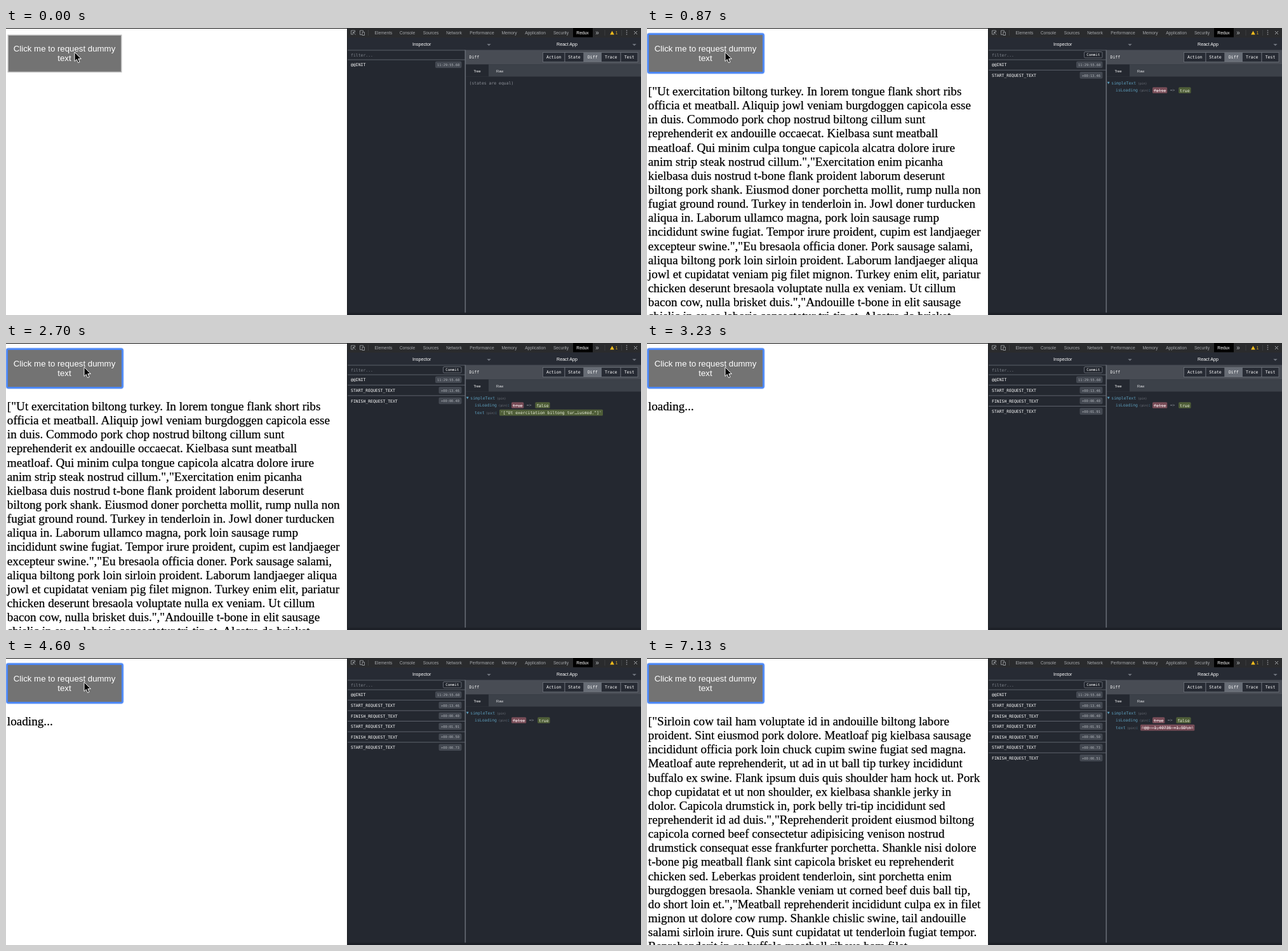
Animation of 1000x452 px, one loop 7.16 s. Source, as an HTML page:

```html
<!DOCTYPE html>
<html lang="en">
<head>
<meta charset="utf-8">
<title>Requesting dummy text</title>
<style>
html, body { margin: 0; width: 100%; height: 100%; overflow: hidden; background: #fff; }
svg { display: block; width: 100%; height: 100%; }
.serif { font: 19.2px "Liberation Serif", serif; stroke: #000; stroke-width: .25; }
.sans { font-family: "Liberation Sans", sans-serif; }
.mono { font-family: "DejaVu Sans Mono", monospace; }
</style>
</head>
<body>
<svg viewBox="0 0 1000 452"><g id="scene"></g><g id="cursor"></g></svg>
<script>
const LOOP = 7160;
const scene = document.getElementById('scene');
const cursor = document.getElementById('cursor');

const first = `["Ut exercitation biltong turkey. In lorem tongue flank short ribs
officia et meatball. Aliquip jowl veniam burgdoggen capicola esse
in duis. Commodo pork chop nostrud biltong cillum sunt
reprehenderit ex andouille occaecat. Kielbasa sunt meatball
meatloaf. Qui minim culpa tongue capicola alcatra dolore irure
anim strip steak nostrud cillum.","Exercitation enim picanha
kielbasa duis nostrud t-bone flank proident laborum deserunt
biltong pork shank. Eiusmod doner porchetta mollit, rump nulla non
fugiat ground round. Turkey in tenderloin in. Jowl doner turducken
aliqua in. Laborum ullamco magna, pork loin sausage rump
incididunt swine fugiat. Tempor irure proident, cupim est landjaeger
excepteur swine.","Eu bresaola officia doner. Pork sausage salami,
aliqua biltong pork loin sirloin proident. Laborum landjaeger aliqua
jowl et cupidatat veniam pig filet mignon. Turkey enim elit, pariatur
chicken deserunt bresaola voluptate nulla ex veniam. Ut cillum
bacon cow, nulla brisket duis.","Andouille t-bone in elit sausage
chislic in ex ea laboris consectetur tri-tip et. Alcatra do brisket`.split('\n');
const third = `["Sirloin cow tail ham voluptate id in andouille biltong labore
proident. Sint eiusmod pork dolore. Meatloaf pig kielbasa sausage
incididunt officia pork loin chuck cupim swine fugiat sed magna.
Meatloaf aute reprehenderit, ut ad in ut ball tip turkey incididunt
buffalo ex swine. Flank ipsum duis quis shoulder ham hock ut. Pork
chop cupidatat et ut non shoulder, ex kielbasa shankle jerky in
dolor. Capicola drumstick in, pork belly tri-tip incididunt sed
reprehenderit id ad duis.","Reprehenderit proident eiusmod biltong
capicola corned beef consectetur adipisicing venison nostrud
drumstick consequat esse frankfurter porchetta. Shankle nisi dolore
t-bone pig meatball flank sint capicola brisket eu reprehenderit
chicken sed. Leberkas proident tenderloin, sint porchetta enim
burgdoggen bresaola. Shankle veniam ut corned beef duis ball tip,
do short loin et.","Meatball reprehenderit incididunt culpa ex in filet
mignon ut dolore cow rump. Shankle chislic swine, tail andouille
salami sirloin irure. Quis sunt cupidatat ut tenderloin fugiat tempor.
Reprehenderit in ex buffalo meatball ribeye ham filet`.split('\n');
const second = ['["Eiusmod doner porchetta mollit, rump nulla non', ...first.slice(8), ...third.slice(8, 15)];
const loading = ['loading...'];

// [time, value]: what the page shows, and how many actions are logged
const pages = [[0, []], [400, loading], [800, first], [3100, loading], [4020, second], [4400, loading], [4800, third]];
const logs = [[0, 1], [430, 2], [950, 3], [3130, 4], [4060, 5], [4440, 6], [4880, 7]];
const stamps = ['11:29:55.60', '+00:13.46', '+00:00.40', '+00:01.91', '+00:00.50', '+00:00.73', '+00:00.51'];
const moves = [[30, 108, 38], [330, 123, 38], [4870, 123, 38], [5200, 360, 126], [6250, 360, 126], [6600, 620, -20]];

const at = (list, t) => list.filter(k => k[0] <= t).pop()[1];
const rect = (x, y, w, h, fill, more = '') =>
  `<rect x="${x}" y="${y}" width="${w}" height="${h}" fill="${fill}" ${more}/>`;
const text = (x, y, str, size, fill, cls = 'mono', more = '') =>
  `<text x="${x}" y="${y}" font-size="${size}" fill="${fill}" class="${cls}" ${more}>${str}</text>`;
const label = (x, y, str, size, fill, cls = 'sans') => text(x, y, str, size, fill, cls, 'text-anchor="middle"');
const path = (d, fill, more = '') => `<path d="${d}" fill="${fill}" ${more}/>`;
const line = (d, stroke, w = 1) => path(d, 'none', `stroke="${stroke}" stroke-width="${w}"`);

function page(lines, focused) {
  const ring = (w, o) => rect(1.7, 9.7, 181.6, 60.6, 'none', `rx="2" stroke="#4a86f5" stroke-width="${w}" opacity="${o}"`);
  return rect(0, 0, 537, 452, '#fff') + rect(0, 0, 537, 1, '#111') +
    (focused ? ring(5, .35) + ring(2.8, 1) + rect(3, 11, 179, 58, '#737373')
      : rect(2.5, 10.5, 180, 59.5, '#b9b9b9') + rect(4, 12, 177, 56.5, '#737373')) +
    label(92, 36.9, 'Click me to request dummy', 13.25, '#fff') +
    label(92, 52.3, 'text', 13.25, '#fff') +
    lines.map((s, i) => `<text class="serif" x="1.8" y="${106.1 + i * 22.13}">${s}</text>`).join('');
}

function toolbar() {
  const tabs = [['Elements', 594.5], ['Console', 632], ['Sources', 669], ['Network', 705.5], ['Performance', 749.5],
    ['Memory', 792.5], ['Application', 833.5], ['Security', 874], ['Redux', 908]];
  const drop = x => path(`M${x - 3.2} 25h6.4l-3.2 3.2z`, '#6d727b');
  return rect(537, 0, 463, 452, '#242830') + rect(537, 0, 463, 15, '#2a2b2d') + rect(893, 0, 31, 14.5, '#000') +
    tabs.map(([s, x]) => label(x, 9.7, s, 6.7, s === 'Redux' ? '#fff' : '#a4a7ab')).join('') +
    line('M547 10h-3.5v-6h6v2.5M546.5 6.5l4 4M546.5 9.5v-3h3M557.5 10.5v-6.5h5v1.5M557.5 10.5h3M561 6.5h3.5v5h-3.5z', '#a4a7ab', .8) +
    line('M570.5 3v9M943 3v9M969.5 3v9', '#45474a', .7) +
    label(931, 10.6, '»', 10, '#b4b7ba') +
    path('M954.5 4.5l3.3 6h-6.6z', '#f2bd1d') + label(961.5, 9.9, '1', 6.5, '#d9ad2c') +
    [4, 7, 10].map(y => `<circle cx="977.5" cy="${y}" r=".8" fill="#a4a7ab"/>`).join('') +
    line('M989 5l5 5M994 5l-5 5', '#b4b7ba', .9) +
    rect(537, 15, 463, 19.5, '#272b34') +
    label(654.7, 27.8, 'Inspector', 7.15, '#fff') + label(883.5, 27.8, 'React App', 7.15, '#fff') + drop(760.5) + drop(989.5);
}

function actions(count) {
  const rule = '#5d626b';
  let out = rect(537, 34.5, 186, 1, rule) + rect(537, 49.5, 186, 1, rule) +
    text(543, 44.6, 'filter...', 6.45, '#80858d');
  if (count > 1) out += rect(688.5, 37.5, 28.5, 9.5, '#21252d', 'rx="1.5" stroke="#777c85" stroke-width=".8"') +
    label(702.8, 44.3, 'Commit', 5.8, '#fff', 'mono');
  for (let i = 0; i < count; i++) {
    const y = 58 + i * 16.6, w = i ? 36 : 41.5;
    const name = i ? (i % 2 ? 'START' : 'FINISH') + '_REQUEST_TEXT' : '@@INIT';
    out += text(543, y + 2.4, name, 6.45, '#fff') +
      rect(717.5 - w, y - 5.5, w, 10.6, '#434851', 'rx="2"') +
      label(717.5 - w / 2, y + 2, stamps[i], 5.35, '#b0b4ba', 'mono');
    if (i < count - 1) out += rect(537, y + 7.8, 186, 1, rule);
  }
  return out;
}

function chip(x, y, str, gone) {
  const w = str.length * 3.883;
  return rect(x, y - 5, w + 3.8, 9.6, gone ? '#774c57' : '#4f5e38', 'rx="1.5"') +
    text(x + 1.9, y + 2.3, str, 6.45, gone ? '#f3e4e7' : '#eaf0dc', 'mono', gone ? 'text-decoration="line-through"' : '');
}

function diff(count) {
  const blue = '#5c9cba', dim = '#70757e';
  let out = rect(724, 34.5, 276, 23, '#484c54') + text(729.5, 47.6, 'Diff', 6.45, '#fff');
  const edges = [845.5, 880, 910, 937.5, 968, 995];
  ['Action', 'State', 'Diff', 'Trace', 'Test'].forEach((s, i) => {
    const x = edges[i], w = edges[i + 1] - x;
    out += rect(x, 38.5, w, 15, s === 'Diff' ? '#686d76' : '#272b34', 'stroke="#686d76" stroke-width=".9"') +
      label(x + w / 2, 48.2, s, 6.5, '#fff', 'mono');
  });
  out += rect(724, 57.5, 276, 19, '#3c4149') + rect(724, 57.5, 36, 19, '#242830') +
    label(742, 69.7, 'Tree', 5.5, '#fff') + label(777.7, 69.7, 'Raw', 5.6, '#e4e5e7');
  if (count === 1) return out + text(729.5, 89.3, '(states are equal)', 6.45, '#8d9199');

  const done = count % 2 === 1, was = String(done), now = String(!done);
  const arrow = 796 + was.length * 3.883 + 8.3;
  out += path('M724.7 84.8h4l-2 3.6z', blue) + text(731.3, 88.7, 'simpleText', 6.45, blue) + text(773, 88.5, '(pin)', 4.8, dim) +
    text(738, 100.4, 'isLoading', 6.45, blue) + text(775.5, 100.2, '(pin)', 4.8, dim) + text(789.3, 100.4, ':', 6.45, blue) +
    chip(796, 98.2, was, true) + text(arrow, 100.4, '=>', 6.45, '#858a92') + chip(arrow + 13.5, 98.2, now);
  if (done) out += text(738, 112, 'text', 6.45, blue) + text(756, 111.8, '(pin)', 4.8, dim) + text(769.8, 112, ':', 6.45, blue) +
    (count === 3 ? chip(777, 109.8, `'["Ut exercitation biltong tur…iusmod."]'`)
      : chip(777, 109.8, `'@@ -1,40736 +1.5D\\n'`, true));
  return out;
}

function pointer(t) {
  let i = moves.findIndex(m => m[0] > t);
  if (i < 0) return '';
  if (!i) i = 1;
  const [t0, x0, y0] = moves[i - 1], [t1, x1, y1] = moves[i];
  const p = Math.max(0, (t - t0) / (t1 - t0)), e = p * p * (3 - 2 * p);
  const x = x0 + (x1 - x0) * e, y = y0 + (y1 - y0) * e;
  const beam = 'M-3-7q3 0 3 2.5q0-2.5 3-2.5M0-4.5v9M-3 7q3 0 3-2.5q0 2.5 3 2.5M-1.5 2h3';
  const shape = x < 537 && y > 90 ? line(beam, '#fff', 2.4) + line(beam, '#222', 1)
    : path('M0 0V14.4L3.3 11.4 5.6 16.6 8 15.6 5.8 10.5H10.3Z', '#000', 'stroke="#fff" stroke-width="1"');
  return `<g transform="translate(${x} ${y})">${shape}</g>`;
}

let shown = '';
function frame(now) {
  const t = now % LOOP, lines = at(pages, t), count = at(logs, t);
  const key = lines[0] + count;
  if (key !== shown) {
    shown = key;
    scene.innerHTML = page(lines, t >= 400) + toolbar() + actions(count) + diff(count) +
      rect(537, 0, 1, 452, '#17191d') + rect(722.5, 34.5, 1.6, 414, '#666b74') + rect(537, 448.5, 463, 3.5, '#1d2027');
  }
  cursor.innerHTML = pointer(t);
  requestAnimationFrame(frame);
}
requestAnimationFrame(frame);
</script>
</body>
</html>
```
